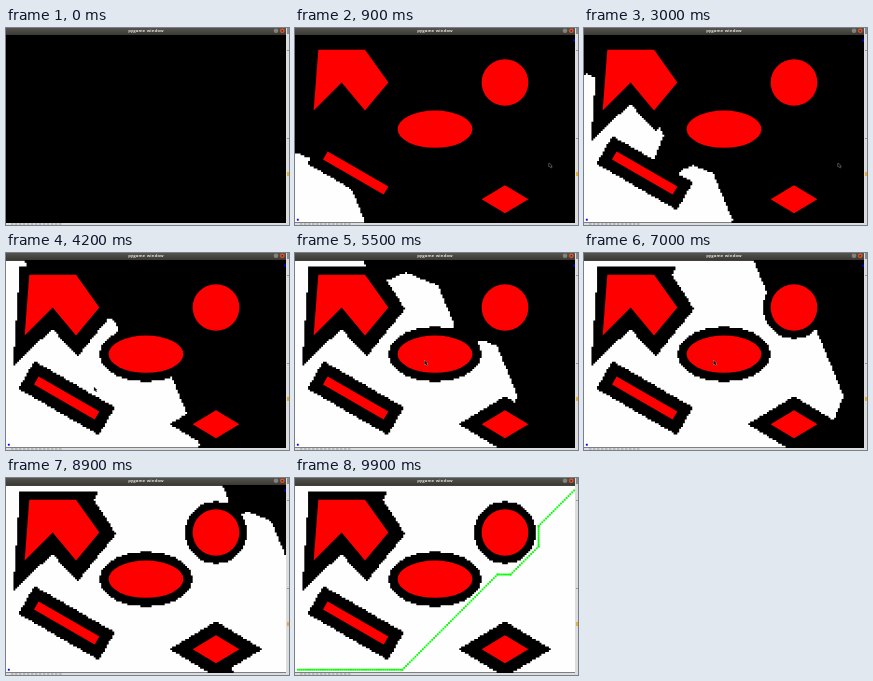
Recreate the animation shown at these times as an HTML page with a canvas. Size 283 by 197 pixels, loop 10 s.

```html
<!DOCTYPE html>
<html lang="en">
<head>
<meta charset="utf-8">
<title>Path search</title>
<style>
  html, body { margin: 0; width: 283px; height: 197px; overflow: hidden; background: #000; }
  canvas { display: block; }
  #title {
    position: absolute; left: 0; top: 0; width: 280px; height: 6px;
    font: bold 4.2px/5.6px "Open Sans", sans-serif; letter-spacing: .14px;
    color: #e4e0d8; text-align: center; white-space: nowrap;
  }
</style>
</head>
<body>
<canvas id="stage" width="283" height="197"></canvas>
<div id="title">pygame window</div>
<script>
const g = document.getElementById('stage').getContext('2d');
const COLS = 150, ROWS = 100, CELL = 28 / 15, TOP = 7.85;
const START = [1, 98], GOAL = [149, 2];

// Map units (300 x 200, y upwards) to pixels
const mapX = x => x * CELL / 2;
const mapY = y => TOP + (200 - y) * CELL / 2;

function polygon(points) {
  const p = new Path2D();
  points.forEach(([x, y]) => p.lineTo(x, y));
  p.closePath();
  return p;
}
function ellipse(x, y, rx, ry) {
  const p = new Path2D();
  p.ellipse(x, y, rx, ry, 0, 0, 2 * Math.PI);
  return p;
}
const mapPolygon = points => polygon(points.map(([x, y]) => [mapX(x), mapY(y)]));
const mapEllipse = (x, y, rx, ry) => ellipse(mapX(x), mapY(y), mapX(rx), mapX(ry));

// Each obstacle keeps the search away by its margin, or by a wider zone
const obstacles = [
  { path: mapPolygon([[25, 185], [75, 185], [100, 150], [75, 120], [50, 150], [20, 120]]), margin: 8,
    zone: polygon([[14, 13], [93, 13], [88, 22], [110, 56], [72, 103], [46, 76], [7, 114]]) },
  { path: mapPolygon([[30, 67.5], [35, 76], [100, 38.5], [95, 30]]), margin: 11.4 },
  { path: mapPolygon([[225, 40], [250, 25], [225, 10], [200, 25]]), margin: 11.9 },
  { path: mapEllipse(225, 150, 25, 25), margin: 7.6 },
  { path: mapEllipse(150, 100, 40, 20), margin: 8.6 }
];

function isFree(c, r) {
  const x = (c + .5) * CELL, y = TOP + (r + .5) * CELL;
  return !obstacles.some(({ path, margin, zone }) => {
    g.lineWidth = 2 * margin;
    return g.isPointInPath(zone || path, x, y) || !zone && g.isPointInStroke(path, x, y);
  });
}

// Shortest 8-connected distance from the start to each cell, in pixels
function distances() {
  const free = [], dist = new Float64Array(COLS * ROWS).fill(Infinity);
  for (let i = 0; i < COLS * ROWS; i++) free.push(isFree(i % COLS, Math.floor(i / COLS)));
  let edge = [START];
  dist[START[1] * COLS + START[0]] = 0;
  while (edge.length) {
    const next = [];
    for (const [c, r] of edge)
      for (let dc = -1; dc <= 1; dc++)
        for (let dr = -1; dr <= 1; dr++) {
          const x = c + dc, y = r + dr, i = y * COLS + x;
          if (x < 0 || y < 0 || x >= COLS || y >= ROWS || !free[i]) continue;
          const d = dist[r * COLS + c] + Math.hypot(dc, dr) * CELL;
          if (d < dist[i] - 1e-6) {
            dist[i] = d;
            next.push([x, y]);
          }
        }
    edge = next;
  }
  return dist;
}
const dist = distances();

const route = [START, [57, 98], [108, 47], [115, 47], [130, 32], [130, 21], GOAL];
const reach = [[200, 40], [5500, 240], [8900, 324], [9800, 370]];
const pointer = [[3600, 254, 135], [4200, 88, 134], [5200, 129.5, 107.5]];

// Linear interpolation between [time, ...values] keys
function at(keys, t) {
  let i = 1;
  while (i < keys.length - 1 && t > keys[i][0]) i++;
  const a = keys[i - 1], b = keys[i];
  const k = Math.max(0, Math.min(1, (t - a[0]) / (b[0] - a[0])));
  return a.slice(1).map((v, n) => v + (b[n + 1] - v) * k);
}

function rect(color, x, y, w, h) {
  g.fillStyle = color;
  g.fillRect(x, y, w, h);
}
function fill(color, path) {
  g.fillStyle = color;
  g.fill(path);
}
const cell = (color, c, r) => rect(color, c * CELL, TOP + r * CELL, CELL, CELL);

function drawWindow() {
  rect('#dcdcdc', 0, 0, 283, 197);
  rect('#8c8c8c', 281, 0, 2, 6);
  rect('#999', 281, 22, 2, 1);
  rect('#999', 281, 110, 2, 1);
  rect('#e8b030', 281, 144, 2, 4);
  for (let x = 5; x < 54; x += 4) rect('#999', x, 195.5, 2.5, 1);
  rect('#000', 0, 6, 280, 189);
  const bar = g.createLinearGradient(0, 0, 0, 7);
  bar.addColorStop(0, '#55534d');
  bar.addColorStop(1, '#3a3934');
  rect(bar, 0, 0, 280, 7);
  fill('#85827a', ellipse(270, 2.8, 2.3, 2.3));
  fill('#e2552c', ellipse(276.3, 2.8, 2.3, 2.3));
  rect('#5a2a18', 275.5, 2, 1.6, 1.6);
}

// Visited cells joined into row runs, filled as one path so no seams show
function drawVisited(limit) {
  const p = new Path2D();
  for (let r = 0; r < ROWS; r++)
    for (let c = 0; c < COLS; c++) {
      const first = c;
      while (c < COLS && dist[r * COLS + c] <= limit) c++;
      if (c > first) p.rect(first * CELL, TOP + r * CELL, (c - first) * CELL, CELL);
    }
  fill('#fefefe', p);
}

function drawRoute() {
  route.slice(1).forEach(([c1, r1], i) => {
    const [c0, r0] = route[i];
    const n = Math.max(Math.abs(c1 - c0), Math.abs(r1 - r0));
    for (let k = 0; k <= n; k++)
      cell('#0f0', c0 + (c1 - c0) * k / n, r0 + (r1 - r0) * k / n);
  });
}

function drawPointer(x, y) {
  const arrow = polygon([[0, 0], [0, 4], [1, 3.2], [2, 5], [2.8, 4.5], [2, 3], [3.2, 2.9]]);
  g.save();
  g.translate(x, y);
  g.strokeStyle = '#bbb';
  g.lineWidth = .6;
  g.stroke(arrow);
  fill('#111', arrow);
  g.restore();
}

function draw(t) {
  drawWindow();
  if (t < 200) return;
  drawVisited(at(reach, t)[0]);
  obstacles.forEach(({ path }) => fill('#f00', path));
  if (t >= 9800) {
    drawRoute();
  } else {
    cell('#00f', ...START);
    cell('#00f', ...GOAL);
  }
  if (t < 7800) drawPointer(...at(pointer, t));
}

const begin = performance.now();
let shown = -1;
function tick() {
  const t = Math.floor((performance.now() - begin) % 10000 / 100) * 100;
  if (t !== shown) draw(shown = t);
  requestAnimationFrame(tick);
}
tick();
</script>
</body>
</html>
```
